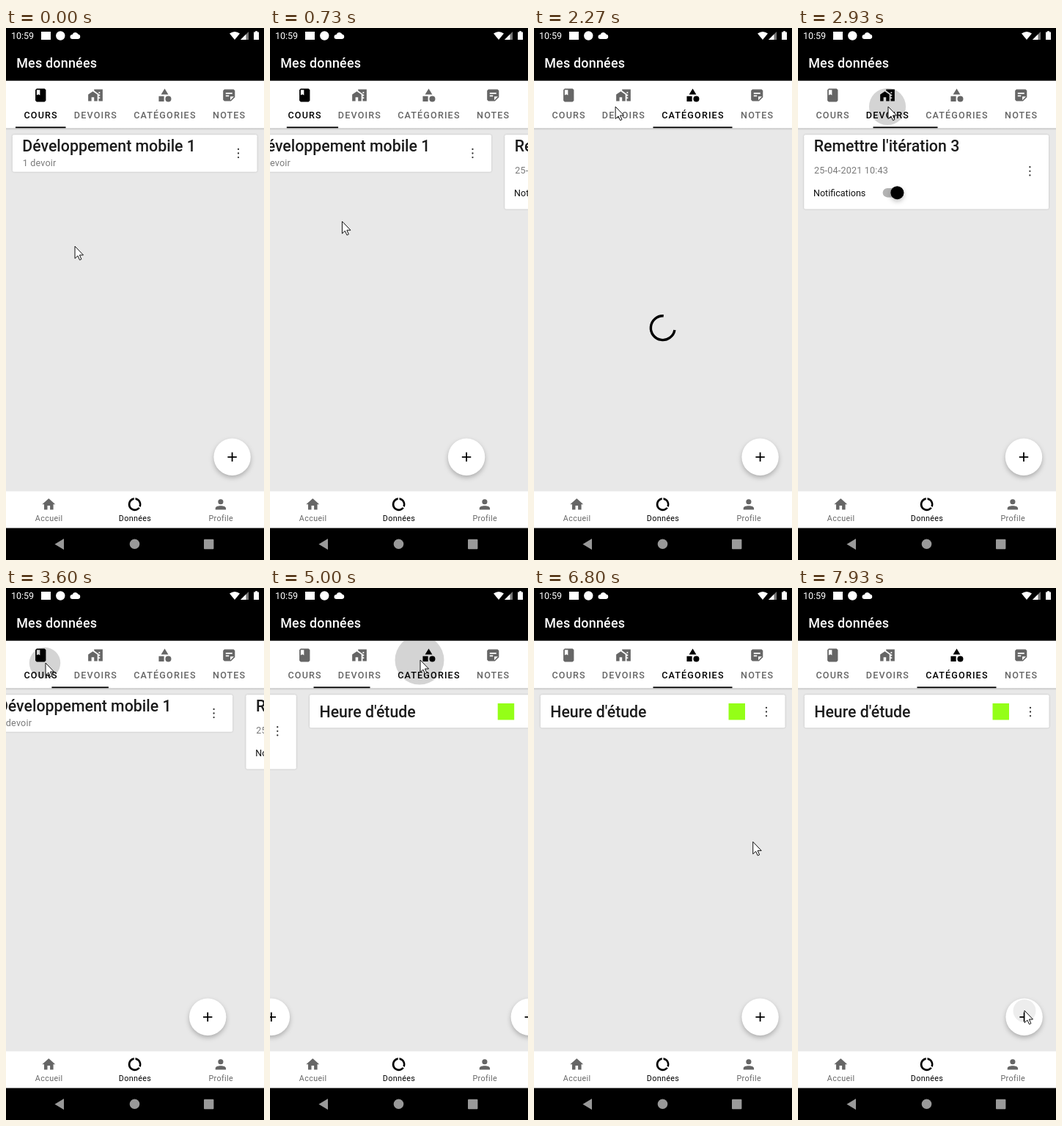
An HTML page for the animation above (8000 ms loop, 352 by 724 pixels).

```html
<!DOCTYPE html>
<html lang="fr">
<head>
<meta charset="utf-8">
<style>
html, body { margin: 0; width: 100%; height: 100%; overflow: hidden; background: #000; }
svg { display: block; width: 352px; height: 724px; font-family: Roboto, sans-serif; }
.tab, .nav { fill: #666; }
.tab text, .nav text { text-anchor: middle; }
.tab text { font-size: 12.55px; font-weight: 500; letter-spacing: 1.17px; }
.nav text { font-size: 10.76px; letter-spacing: .36px; }
.on { fill: #000; }
.head { font-size: 21.3px; font-weight: 500; fill: #1c1c1c; }
.body { font-size: 12.55px; letter-spacing: .2px; fill: #7a7a7a; }
.card { fill: #fff; filter: drop-shadow(0 .8px 1px rgba(0,0,0,.22)); }
.fab { fill: #fff; filter: drop-shadow(0 3px 3px rgba(0,0,0,.25)); }
</style>
</head>
<body>
<svg viewBox="0 0 352 724">
  <defs>
    <clipPath id="bar"><path d="M0 71.700h352v64.500H0z"/></clipPath>
    <linearGradient id="shade" x2="0" y2="1">
      <stop stop-opacity=".16"/><stop offset="1" stop-opacity="0"/>
    </linearGradient>
    <g id="dots" fill="#333"><circle cy="-5.600" r="1.150"/><circle r="1.150"/><circle cy="5.600" r="1.150"/></g>
    <g id="add">
      <circle class="fab" cx="308.600" cy="583.800" r="25.200"/>
      <path d="M302.400 583.800h12.400M308.600 577.600v12.400" stroke="#000" stroke-width="1.800"/>
    </g>
  </defs>

  <path fill="#e8e8e8" d="M0 136h352v495H0z"/>
  <g id="pages"></g>
  <circle id="press" cx="309" cy="575.500" r="15.500" fill-opacity=".07"/>

  <path d="M0 0h352v72H0zM0 680h352v44H0z"/>
  <g fill="#fff">
    <text x="6.900" y="15" font-size="12.550">10:59</text>
    <path d="M48 5h13v11H48z"/>
    <circle cx="74.300" cy="10.500" r="6.200"/>
    <path d="M90.500 15a3 3 0 0 1 0-6a4.300 4.300 0 0 1 8-.5a3.300 3.300 0 0 1 0 6.500z"/>
    <path d="M305 7.600Q312 2.600 319 7.600L312 16z"/>
    <path d="M320 16L331 5V16z" fill="#777"/><path d="M320 16l7.500-7.500V16z"/>
    <path d="M338 5.500h2V4.300h3v1.200h2V16h-7z"/>
    <text x="14.200" y="53.500" font-size="17.930" font-weight="500" letter-spacing=".2">Mes données</text>
    <path d="M0 71.700h352v64.500H0zM0 630.400h352v50.200H0z"/>
  </g>
  <path fill="url(#shade)" d="M0 136.200h352v3H0z"/>
  <g clip-path="url(#bar)"><circle id="ripple"/></g>
  <g id="tabs"></g>
  <rect id="mark" y="134.400" height="1.800"/>
  <g id="nav"></g>
  <g fill="#999">
    <path d="M79 695v15l-12.500-7.500z"/>
    <circle cx="175.500" cy="702.300" r="6.800"/>
    <rect x="270" y="695.800" width="13.400" height="13.400" rx="1"/>
  </g>
  <path id="cursor" d="M0 0V16.600L3.900 13 6.500 18.700 8.900 17.600 6.400 12H11.500z" fill="#fff" stroke="#111" stroke-linejoin="round"/>
</svg>
<script>
const $ = id => document.getElementById(id);
const set = (id, attrs) => Object.entries(attrs).forEach(([k, v]) => $(id).setAttribute(k, v));
const show = (id, on) => $(id).style.display = on ? '' : 'none';
const clamp = u => Math.min(1, Math.max(0, u));
const lerp = (a, b, u) => a + (b - a) * u;
const settle = u => 1 - (1 - clamp(u)) ** 5;
const smooth = u => (u = clamp(u), u * u * (3 - 2 * u));

const icons = {
  book: 'M6 2h12l2 2v16l-2 2H6l-2-2V4zM6 4v8l2.5-1.5L11 12V4z',
  work: 'M1 11v10h5v-6h4v6h5V11L8 6zM10 3v2l7 5v1h2v2h-2v2h2v2h-2v4h6V3zM17 7h2v2h-2z',
  shapes: 'M12 2l-5.5 9h11zM3 13.5h8v8H3zM13 17.5a4.5 4.5 0 1 0 9 0a4.5 4.5 0 1 0-9 0z',
  note: 'M5 3h14l2 2v10l-6 6H5l-2-2V5zM7 8v2h10V8zM7 12v2h5v-2zM14 19.5l5.5-5.5H14z',
  home: 'M10 20v-6h4v6h5v-8h3L12 3 2 12h3v8z',
  data: 'M13 2a10 10 0 0 1 8 14l-2.5-1.5A7 7 0 0 0 13 5zM11 2v3a7 7 0 1 0 6.6 11.3l2.5 1.6A10 10 0 1 1 11 2z',
  person: 'M8 8a4 4 0 0 1 8 0a4 4 0 0 1-8 0zM4 20v-2c0-5 16-5 16 0v2z'
};
const item = (kind, icon, label, x, iconY, textY) => `<g class="${kind}">
  <path d="${icons[icon]}" fill-rule="evenodd" transform="translate(${x - 10.75} ${iconY - 10.75}) scale(.896)"/>
  <text x="${x + .4}" y="${textY}">${label}</text></g>`;

// Borders between the tabs
const edges = [13, 81.5, 162.5, 270.5, 338];
$('tabs').innerHTML = [['book', 'COURS'], ['work', 'DEVOIRS'], ['shapes', 'CATÉGORIES'], ['note', 'NOTES']]
  .map(([icon, label], i) => item('tab', icon, label, (edges[i] + edges[i + 1]) / 2, 91.5, 123)).join('');
$('nav').innerHTML = [['home', 'Accueil'], ['data', 'Données'], ['person', 'Profile']]
  .map(([icon, label], i) => item('nav', icon, label, 58.3 + 117.3 * i, 648.3, 671.3)).join('');
$('nav').children[1].classList.add('on');

const card = (height, title, titleY, dotsY, rest) => `<g class="content">
  <rect class="card" x="8.8" y="145.3" width="333.8" height="${height}" rx="2"/>
  <text class="head" x="22.3" y="${titleY}">${title}</text>
  <use href="#dots" x="317" y="${dotsY}"/>${rest}</g>`;
$('pages').innerHTML = [
  card(50.5, 'Développement mobile 1', 168, 170.5, '<text class="body" x="22.7" y="188">1 devoir</text>'),
  card(101.3, "Remettre l'itération 3", 168, 194.8, `
    <text class="body" x="22.7" y="198.3">25-04-2021 10:43</text>
    <text class="body" x="21.6" y="229" style="fill:#111;letter-spacing:0">Notifications</text>
    <rect x="116.3" y="218" width="27" height="12.4" rx="6.2" fill="#b3b3b3"/>
    <circle class="fab" cx="136" cy="224.2" r="9" style="fill:#000"/>`),
  card(45, "Heure d'étude", 176, 168.5, '<path fill="#94ff17" d="M265.5 157h22.5v22.5h-22.5z"/>') +
    '<path id="spinner" d="M191.9 411A16.4 16.4 0 1 1 176.8 391.8" fill="none" stroke="#000" stroke-width="3.4"/>'
].map((page, i) => `<g transform="translate(${352 * i})">${page}<use href="#add"/></g>`).join('');
$('pages').children[2].firstChild.id = 'category';

// Pointer moves: start, end, target x, y, sideways swing x, y
const moves = [
  [133, 600, 139, 266], [600, 1067, -3, 256], [1067, 1467, 256, 199], [1467, 1733, 205, 104],
  [2000, 2267, 111, 107], [2400, 2600, 123, 107], [3067, 3333, 54, 102], [4400, 4733, 205, 98, 0, -20],
  [5133, 5333, 193, 115], [5400, 5933, 325, 164], [6000, 6467, 323, 164, -147, 96],
  [6667, 7067, 250, 179, 0, 204], [7267, 7867, 309, 575, -88, 0]
];
function pointer(t) {
  let x = 94, y = 297;
  for (const [start, end, tx, ty, sx = 0, sy = 0] of moves) {
    const u = clamp((t - start) / (end - start)), swing = Math.sin(Math.PI * u);
    x = lerp(x, tx, u) + sx * swing;
    y = lerp(y, ty, u) + sy * swing;
  }
  return [x, y];
}

const release = 1067;
const taps = [[1900, 2], [2780, 1], [3520, 0], [4910, 2]];  // time, tab

function draw(t) {
  // A swipe leads from the first to the second tab, taps do the rest
  const drag = 142 / 352 * clamp((t - 600) / (release - 600));
  let page = lerp(drag, 1, settle((t - release) / 634));
  let mark = page ** .9;
  let tab = t < release - 1 ? 0 : 1;
  set('ripple', { r: 0 });
  for (const [start, to] of taps) {
    const age = t - start;
    if (age < 0) break;
    page = lerp(tab, to, settle(age / 213));
    mark = lerp(tab, to, smooth(age / 230));
    tab = to;
    const [cx, cy] = pointer(start);
    set('ripple', {
      cx: cx - 1, cy,
      r: .31 * (edges[to + 1] - edges[to]) * clamp(age / 80),
      'fill-opacity': .17 * clamp((350 - age) / 200)
    });
  }
  set('pages', { transform: `translate(${-352 * page})` });
  [...$('tabs').children].forEach((el, i) => el.classList.toggle('on', i === tab));

  const i = Math.floor(mark);
  const [left, right] = [i, i + 1].map(k => lerp(edges[k], edges[Math.min(k + 1, 4)], mark - i));
  set('mark', { x: left, width: right - left });

  const loading = t < 2320;
  show('category', !loading);
  show('spinner', loading);
  set('spinner', { transform: `rotate(${(t - 2267) * .4} 175.5 408.2)` });
  show('press', t > 7900);

  const [x, y] = pointer(t);
  set('cursor', { transform: `translate(${x} ${y})` });
}

function loop(now) {
  draw(Math.floor((now % 8000 + 4) * 3 / 200) % 120 * 200 / 3);
  requestAnimationFrame(loop);
}
requestAnimationFrame(loop);
</script>
</body>
</html>
```
